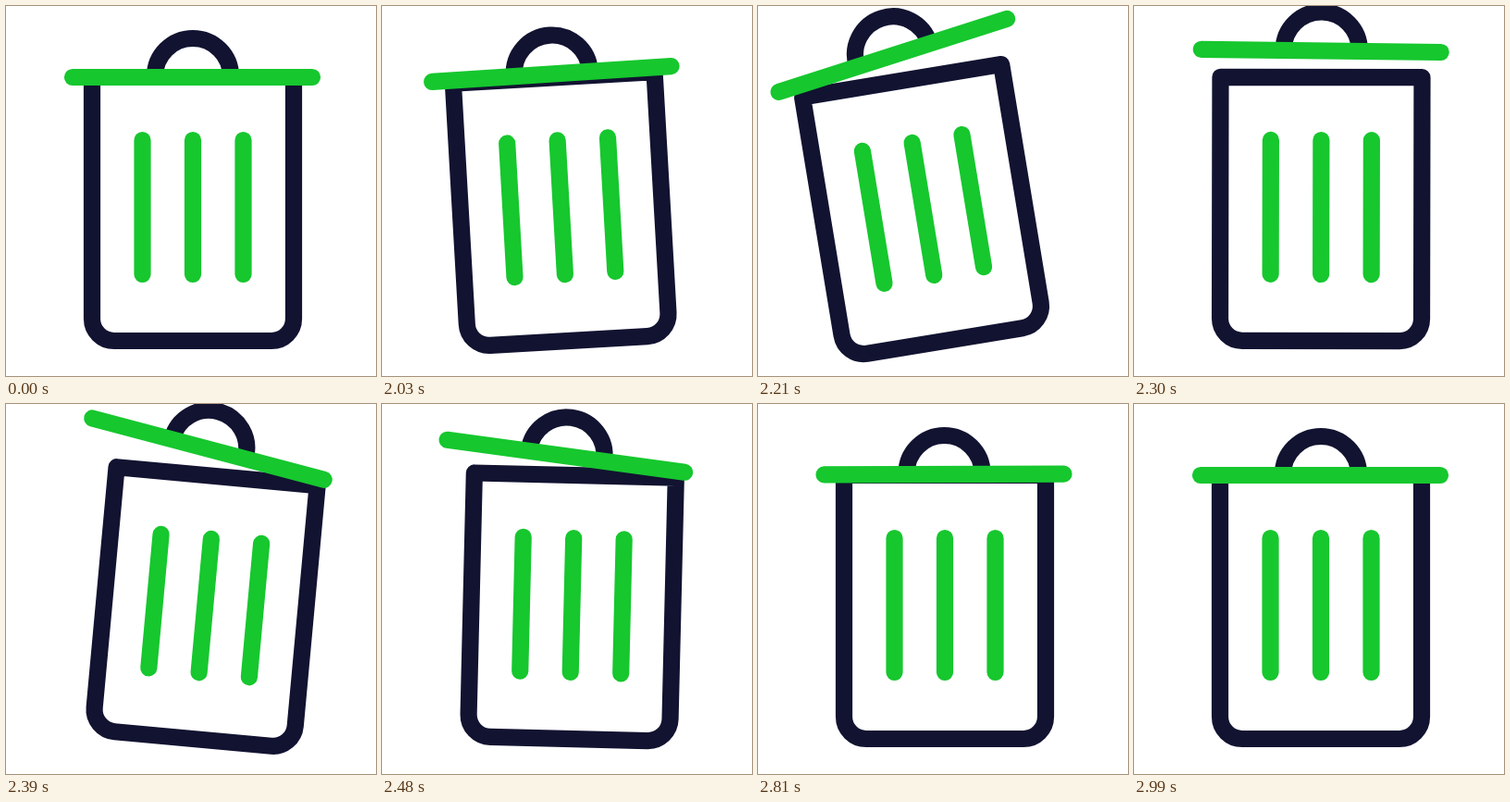
These frames come from a looping animation (400x400 px, 3.02 s). An HTML page:

```html
<!DOCTYPE html>
<html lang="en">
<head>
<meta charset="utf-8">
<title>Trash can</title>
<style>
  html, body { margin: 0; width: 100%; height: 100%; overflow: hidden; background: #fff; }
  svg { display: block; width: 100vw; height: 100vh; }
  path { fill: none; stroke-width: 18.2; stroke-linejoin: round; }
  .dark { stroke: #121331; }
  .green { stroke: #16c72e; stroke-linecap: round; }
</style>
</head>
<body>
<svg viewBox="0 0 400 400">
  <g id="can">
    <path class="dark" d="M93 77H311V338a24 24 0 0 1-24 24H117a24 24 0 0 1-24-24Z"/>
    <path class="green" d="M147.5 145V290M202 145V290M256.5 145V290"/>
    <g id="lid">
      <path class="dark" d="M161 76a41 41 0 0 1 82 0"/>
      <path class="green" d="M72 77H331"/>
    </g>
  </g>
</svg>
<script>
const LOOP = 3020, START = 2030, STEP = 30;
const can = document.getElementById('can');
const lid = document.getElementById('lid');

const out = power => u => 1 - (1 - u) ** power;
const swing = u => (1 - Math.cos(Math.PI * u)) / 2;

// Each key: [time in ms, value, easing that leads to it]
const canTurn = [[2000, 0], [2200, -9.5, out(2.6)], [2375, 6.2, swing], [2600, 0, out(2.4)]];
const lidTurn = [[2000, 0], [2200, -8.5, swing], [2400, 9.7, swing], [2660, -0.3, out(1.1)], [2960, 0, swing]];
const lidX = [[2000, 0], [2200, -4.8, out(2.6)], [2300, 0.2, swing], [2420, -13.8, swing], [3000, 0, out(3)]];
const lidY = [[2000, 0], [2210, -28.6, out(1)], [2420, -28.6, out(1)], [3000, 0, out(3)]];

function valueAt(keys, t) {
  const next = keys.findIndex(key => key[0] > t);
  if (next < 0) return keys[keys.length - 1][1];
  if (next === 0) return keys[0][1];
  const [t0, v0] = keys[next - 1];
  const [t1, v1, ease] = keys[next];
  return v0 + (v1 - v0) * ease((t - t0) / (t1 - t0));
}

function draw(now) {
  const time = now % LOOP;
  // Rests until START, then advances in fixed steps
  const t = time < START ? 0 : START + Math.floor((time - START) / STEP) * STEP;
  const at = keys => valueAt(keys, t).toFixed(3);
  can.setAttribute('transform', `rotate(${at(canTurn)} 202 362)`);
  lid.setAttribute('transform', `translate(${at(lidX)} ${at(lidY)}) rotate(${at(lidTurn)} 201.5 77)`);
}

const begin = performance.now();
function tick() {
  draw(performance.now() - begin);
  requestAnimationFrame(tick);
}
tick();
</script>
</body>
</html>
```
